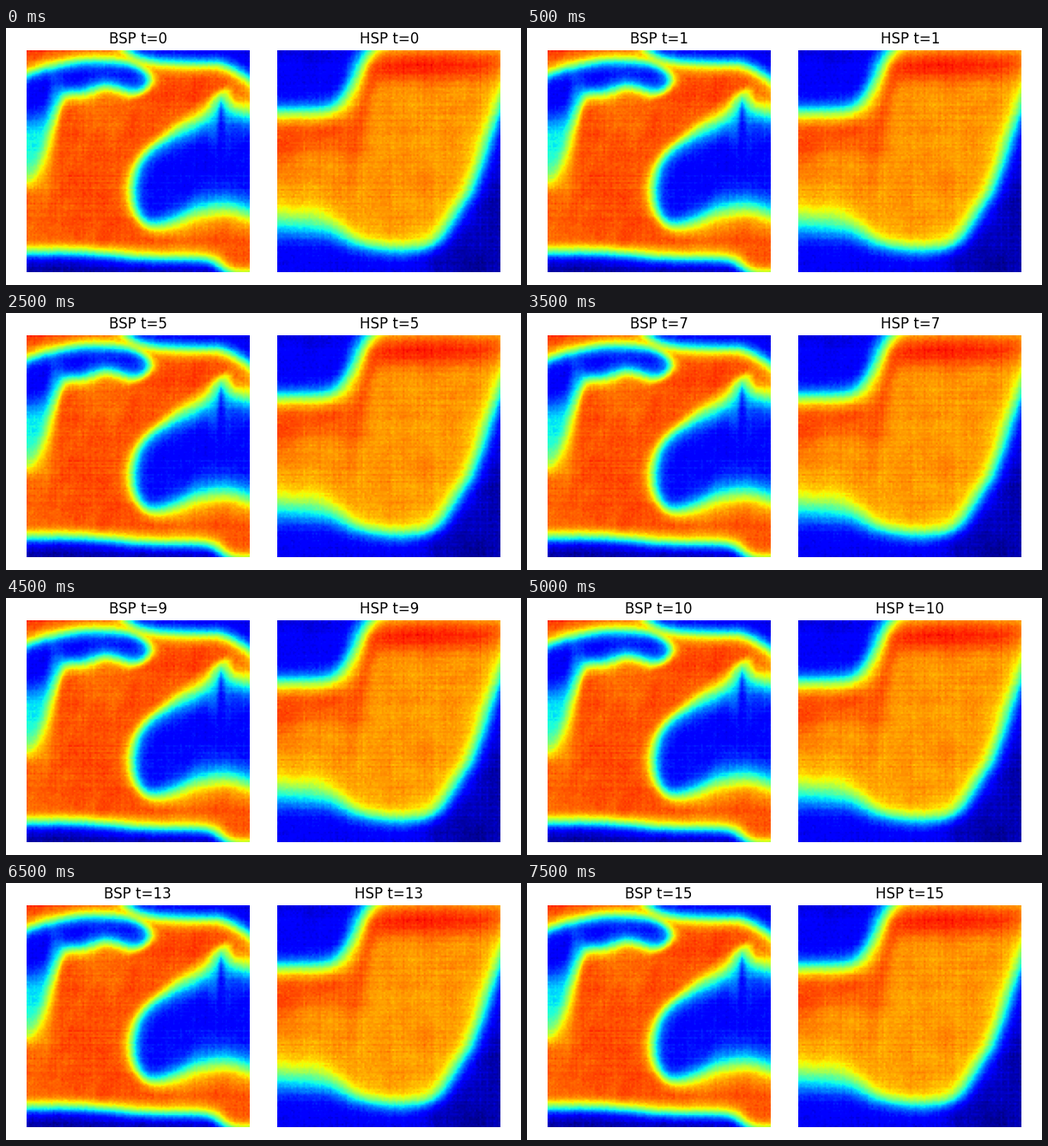
Animation of 600 by 300 pixels, one loop 8 s. Source, as a matplotlib script:

```python
import numpy as np
import matplotlib.pyplot as plt
from matplotlib.animation import FuncAnimation

W, H = 600, 300
N = 128
LEFT, RIGHT, TOP = 23.8, 316.4, 26
WIDE, TALL = 259.8, 259
FRAMES = 16


def grid(x0):
    c = (np.arange(N) + 0.5) / N
    return np.meshgrid(x0 + c * WIDE, TOP + c * TALL)


def step(x, mid, w):
    return 0.5 + 0.5 * np.tanh((x - mid) / (2 * w))


def bump(X, Y, x, y, sx, sy):
    return np.exp(-((X - x) / sx)**2 - ((Y - y) / sy)**2)


def past(v, u, edge):
    """Approximate distance of v beyond the curve v = edge(u)."""
    slope = edge(u + 0.5) - edge(u - 0.5)
    return (v - edge(u)) / np.sqrt(1 + slope**2)


def soft(d, w):
    """Soft mask, one where d is well above zero."""
    return 0.5 + 0.5 * np.tanh(d / w)


def sink(v, mask, low):
    return v + (low - v) * mask


def texture(X, Y, seed):
    r = np.random.default_rng(seed)
    lines = np.where(np.arange(N) % 4 == 0, 0.006, -0.002)
    rows = r.normal(0, 0.005, N) + lines
    cols = r.normal(0, 0.004, N) + lines
    t = r.normal(0, 0.01, (N, N)) + rows[:, None] + cols[None, :]
    for _ in range(10):
        a, b = r.normal(0, 0.12, 2)
        t += 0.003 * np.sin(a * X + b * Y + r.uniform(0, 2 * np.pi))
    return t


def make_bsp():
    X, Y = grid(LEFT)

    # arch with a leg running down the left side
    def arch_top(x):
        return 38 + 16 * ((x - 108) / 84)**2

    def arch_base(x):
        return 72 + 4 * np.cos(np.pi * (x - 85) / 33) + 108 * step(-x, -52, 6)

    def arch_tip(y):
        return 168 - 6 * ((np.minimum(y, 90) - 62) / 12)**2 * (y < 90)

    arch = (soft(past(Y, X, arch_top), 9) * soft(-past(Y, X, arch_base), 10)
            * soft(arch_tip(Y) - X, 9))
    arch_low = 0.1 + 0.28 * step(Y, 106, 8) + 0.12 * step(Y, 158, 7)

    # blue strip in the upper right
    def strip_edge(x):
        return 42 - 16 * np.exp((140 - x) / 20) + 20 * (np.maximum(x - 245, 0) / 40)**1.5

    strip = soft(-past(Y, X, strip_edge), 10)

    # large lake with a peak
    def lake_top(x):
        return (96 + 0.5 * np.maximum(250 - x, 0) + 0.1 * np.maximum(x - 250, 0)
                - 16 * np.exp(-((x - 250) / 10)**2))

    def lake_base(x):
        return 220 + 11 * np.cos(2 * np.pi * (x - 168) / 165)

    def lake_side(y):
        return 147 + 15 * ((y - 190) / 45)**2

    lake = (soft(past(Y, X, lake_top), 10 + 6 * step(X, 185, 12))
            * soft(-past(Y, X, lake_base), 10 + 7 * step(X, 195, 10))
            * soft(X - lake_side(Y), 10))

    def floor_edge(x):
        return 262 + 7 * step(x, 130, 15) + 20 * step(x, 250, 7)

    floor = soft(past(Y, X, floor_edge), 9.5)

    v = (0.825 + 0.03 * bump(X, Y, 24, 26, 60, 14)
         - 0.035 * bump(X, Y, 118, 105, 22, 30)
         + 0.025 * bump(X, Y, 205, 65, 40, 25))
    v = sink(v, arch, arch_low)
    v = sink(v, strip, 0.08)
    v = sink(v, lake, 0.12)
    v = sink(v, floor, 0.03)
    drift = -0.03 * bump(X, Y, 32, 120, 16, 30) + 0.015 * bump(X, Y, 215, 180, 40, 20)
    return v + texture(X, Y, 3), drift


def make_hsp():
    X, Y = grid(RIGHT)

    def sky_edge(x):
        return 97 - 85 * step(x, 408, 10)

    def ground_edge(x):
        return 228 + 30 * step(x, 395, 14)

    def slope_edge(y):
        return 511 + 0.5 * (238 - y) + 6 * np.sin(np.pi * (238 - y) / 98)

    sky = past(Y, X, sky_edge)
    ground = soft(past(Y, X, ground_edge), 22 - 11 * step(X, 385, 12))
    slope = soft(past(X, Y, slope_edge), 13)

    v = (0.748 + 0.08 * np.exp(-((sky - 24) / 24)**2)
         + 0.06 * bump(X, Y, 500, 45, 60, 18)
         + 0.04 * bump(X, Y, 325, 145, 28, 30)
         - 0.05 * np.exp((X - 577) / 5))
    v = sink(v, soft(-sky, 13), 0.1)
    v = sink(v, 1 - (1 - ground) * (1 - slope), 0.1 - 0.06 * step(X, 495, 12))
    drift = -0.012 * bump(X, Y, 420, 170, 60, 50)
    return v + texture(X, Y, 8), drift


fig = plt.figure(figsize=(W / 100, H / 100), dpi=100, facecolor="white")
panels = []
for x0, name, make in ((LEFT, "BSP", make_bsp), (RIGHT, "HSP", make_hsp)):
    field, drift = make()
    ax = fig.add_axes([x0 / W, 1 - (TOP + TALL) / H, WIDE / W, TALL / H])
    ax.axis("off")
    image = ax.imshow(field, cmap="jet", vmin=0, vmax=1, aspect="auto")
    title = ax.set_title("", fontsize=12, fontfamily="DejaVu Sans")
    panels.append((name, field, drift, image, title))


def update(k):
    rng = np.random.default_rng(100 + k)
    for name, field, drift, image, title in panels:
        jitter = rng.normal(0, 0.003, (N, N))
        image.set_data(field + drift * k / (FRAMES - 1) + jitter)
        title.set_text(f"{name} t={k}")


anim = FuncAnimation(fig, update, frames=FRAMES, interval=500, repeat=True,
                     repeat_delay=0, blit=False)
plt.show()
```
